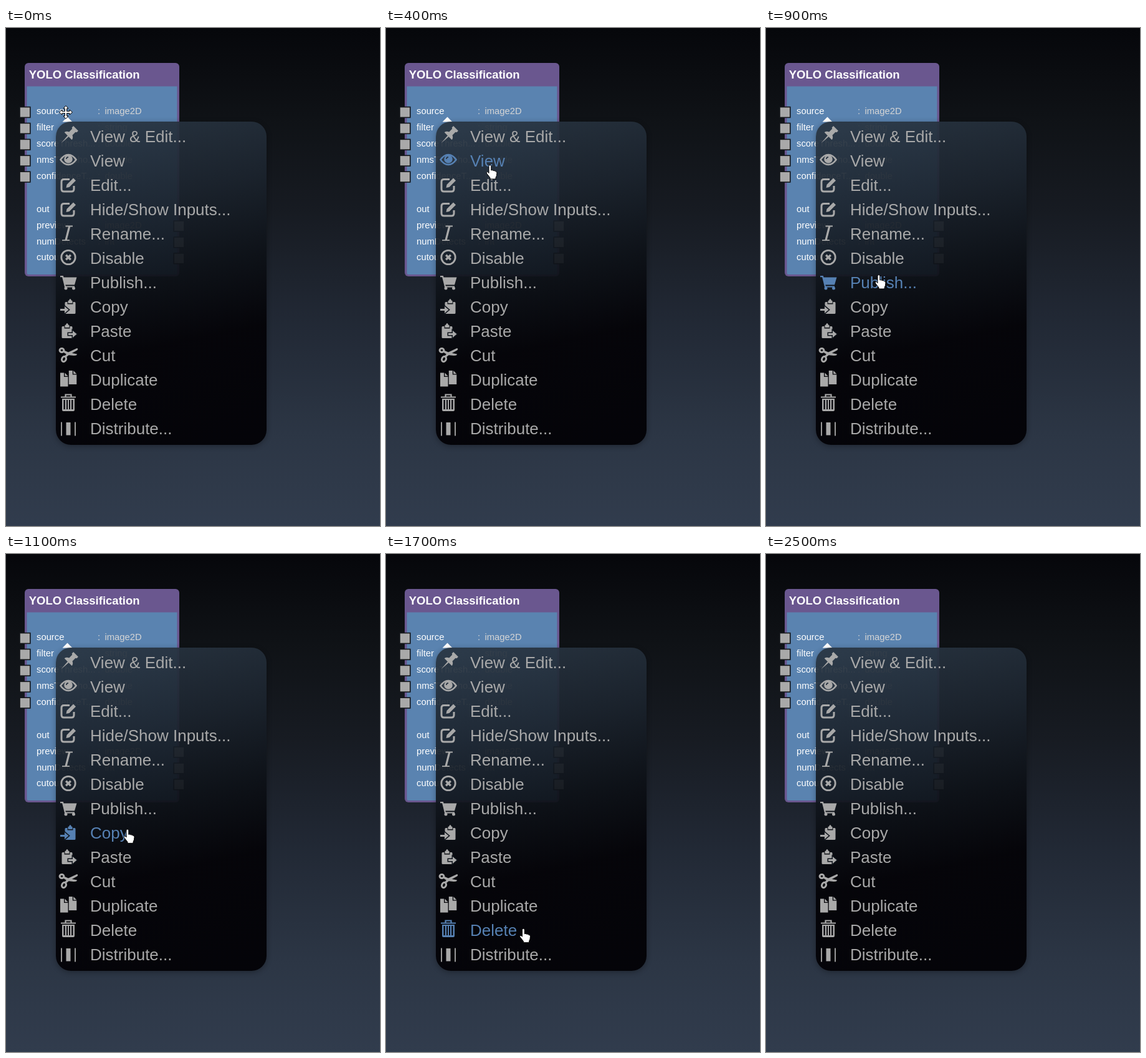
These frames come from a looping animation (600x798 px, 2600 ms). An HTML page:

```html
<!DOCTYPE html>
<html lang="en">
<head>
<meta charset="utf-8">
<title>Context menu</title>
<style>
  html, body { margin: 0; width: 100%; height: 100%; overflow: hidden; background: #14161a; }
  svg { display: block; width: 600px; height: 798px; }
  text { font-family: "Liberation Sans", Arial, sans-serif; white-space: pre; }
  .title { font-size: 18.5px; font-weight: bold; fill: #fff; }
  .label { font-size: 14.8px; fill: #fff; }
  .type { font-size: 14.8px; fill: #d5d5d5; }
  .port { fill: #a9a9a9; stroke: #15171b; stroke-width: 1.6; }
  .row { fill: #a9a9a9; stroke: #a9a9a9; }
  .row.hot { fill: #5681b3; stroke: #5681b3; }
  .row text { font-size: 26px; stroke: none; }
  .solid { stroke: none; }
  .line { fill: none; }
  .cut { stroke: #10151c; stroke-width: 3; paint-order: stroke; }
  .cursor { fill: #fff; stroke: #000; stroke-width: 1; stroke-linejoin: round; }
</style>
</head>
<body>
<svg viewBox="0 0 600 798">
  <defs>
    <linearGradient id="sky" x2="0" y2="1">
      <stop offset="0" stop-color="#06070b"/>
      <stop offset=".18" stop-color="#0f1216"/>
      <stop offset=".37" stop-color="#171b22"/>
      <stop offset=".58" stop-color="#212834"/>
      <stop offset=".82" stop-color="#2c3645"/>
      <stop offset="1" stop-color="#313c4d"/>
    </linearGradient>
    <linearGradient id="glass" gradientUnits="userSpaceOnUse" x1="190" y1="145" x2="300" y2="668">
      <stop offset="0" stop-color="#283441"/>
      <stop offset=".25" stop-color="#1b232d"/>
      <stop offset=".48" stop-color="#0d1117"/>
      <stop offset=".69" stop-color="#030206"/>
      <stop offset="1" stop-color="#010004"/>
    </linearGradient>
    <filter id="soft" x="-10%" y="-10%" width="120%" height="120%">
      <feGaussianBlur stdDeviation="5"/>
    </filter>
    <clipPath id="outside">
      <path clip-rule="evenodd" d="M0 0H600V798H0zM104 150H394a24 24 0 0 1 24 24V644a24 24 0 0 1-24 24H104a24 24 0 0 1-24-24V174a24 24 0 0 1 24-24z"/>
    </clipPath>
  </defs>

  <rect width="600" height="798" fill="url(#sky)"/>

  <rect x="30" y="56" width="248" height="342" rx="6" fill="#6a578f"/>
  <path d="M33.500 93.500h241v299q0 2.500-2.500 2.500h-236q-2.500 0-2.500-2.500z" fill="#5a83b0"/>
  <text class="title" x="36.700" y="81">YOLO Classification</text>
  <g id="node"></g>

  <path d="M98.500 142.500l8 8h-16z" fill="#fff"/>
  <g clip-path="url(#outside)">
    <rect x="80" y="152" width="338" height="518" rx="24" fill="#000" opacity=".3" filter="url(#soft)"/>
  </g>
  <rect x="80" y="150" width="338" height="518" rx="24" fill="url(#glass)" opacity=".93"/>
  <g id="menu"></g>

  <path id="move" class="cursor" transform="translate(96 135)"
    d="M0-10.500l4 4.500h-2.500v4.500h4.500v-2.500l4.500 4-4.500 4v-2.500h-4.500v4.500h2.500l-4 4.500-4-4.500h2.500v-4.500h-4.500v2.500l-4.500-4 4.500-4v2.500h4.500v-4.500h-2.500z"/>
  <path id="hand" class="cursor" visibility="hidden"
    d="M-2 12V1.500a1.900 1.900 0 0 1 3.800 0V8q2-1 3.400.6 2-.6 3.200 1 2.400-.2 2.600 2.400 0 5-2 8V22H0v-2L-5.500 13q-1-2 1-2.400 1.300-.2 2.500 2z"/>
</svg>

<script>
const $ = id => document.getElementById(id);

const inputs = [
  ["source", "image2D"], ["filter", "string"], ["scoreThresh...", "double"],
  ["nmsThresho...", "double"], ["confidenceT...", "double"]
];
const outputs = [["out", ""], ["preview", "image2D"], ["numDetects", "int"], ["cutouts", ""]];

const field = ([name, type], y) =>
  `<text class="label" x="49" y="${y}">${name}</text>` +
  (type && `<text class="type" x="147" y="${y}">:</text><text class="type" x="158.500" y="${y}">${type}</text>`);
const port = (x, y) => `<rect class="port" x="${x}" y="${y}" width="16.800" height="16.800"/>`;

$("node").innerHTML =
  inputs.map((f, i) => field(f, 138.3 + 25.8 * i) + port(22, 126.6 + 25.9 * i)).join("") +
  outputs.map((f, i) => field(f, 295 + 25.8 * i) + (i ? port(269.2, 283.2 + 25.9 * i) : "")).join("");

const solid = (d, more = "") => `<path class="solid" ${more} d="${d}"/>`;
const line = (d, w) => `<path class="line" stroke-width="${w}" d="${d}"/>`;

const edit = line("M2-9.500H-7q-4 0-4 4V6q0 4 4 4H5q4 0 4-4V1", 3) +
  solid("M-3.500 4l1-5L8-11.500l4 4L1.500 3z");
const board = x => `<g transform="translate(${x})">` +
  solid("M-7-8h2.500v3.500h9V-8H7q1.500 0 1.500 1.500V9.500q0 1.500-1.500 1.500H-7q-1.500 0-1.500-1.500V-6.500Q-8.500-8-7-8z") +
  solid("M-3.500-6v-4q2 0 2-1.500 1.500-3 3 0 0 1.500 2 1.500v4z") + "</g>";
const arrow = x => `<path class="cut" transform="translate(${x} 4.500)" d="M-7-1.500h7v-4l6.500 5.500-6.500 5.500v-4h-7z"/>`;
const sheet = (x, y) => `<g transform="translate(${x} ${y})">` + solid("M0 0h6v6.500h6.500V22H0z") + solid("M7.300 0l5.200 5.200H7.300z") + "</g>";

// Icons are drawn around the middle of their row.
const items = [
  ["View &amp; Edit...", solid("M-5.500-17h11v3.500l-1.800 1v7q4.300 2 4.800 6h-17q.5-4 4.800-6v-7l-1.800-1zM-1.200.5h2.400l-1.200 15.500z",
    'transform="translate(0 -1) rotate(45)"')],
  ["View", line("M-12.500-2Q-7-10 0-10T12.500-2Q7 6 0 6T-12.500-2z", 2.6) +
    solid("M-6.800-3a6.800 6.800 0 0 0 13.600 0 6.800 6.800 0 0 0-13.600 0zM-4-3q0-4 4-4v1.800q-2.200 0-2.200 2.200z", 'fill-rule="evenodd"')],
  ["Edit...", edit],
  ["Hide/Show Inputs...", edit],
  ["Rename...", line("M-4.500-12.500H7M-10 10.200H2", 1.8) + line("M1.800-12.500L-4 10.200", 3.2)],
  ["Disable", `<circle class="line" cy="-1.500" r="11.200" stroke-width="2.800"/>` + line("M-3.800-5.300L3.800 2.300M3.800-5.300L-3.800 2.300", 3.4)],
  ["Publish...", line("M-13-9.800h4L-5 6.500H10", 2.2) + solid("M-9-8.500H13.500L10 3.500H-6z") +
    `<circle class="solid" cx="-4" cy="9" r="2.500"/><circle class="solid" cx="8.500" cy="9" r="2.500"/>`],
  ["Copy", board(3) + arrow(-6)],
  ["Paste", board(-2) + arrow(7)],
  ["Cut", `<ellipse class="line" cx="-10.500" cy="-8.500" rx="3.400" ry="2.900" stroke-width="3"/>` +
    `<ellipse class="line" cx="-7" cy="5.500" rx="3.300" ry="4.300" stroke-width="3" transform="rotate(25 -7 5.500)"/>` +
    solid("M-8-9L1-5 14-2.500q0 2.500-5 2.500L-1-1-9-6zM-6.500 1L0-5.500 14-12q2.500 1.500 0 3.500L2-2-4 3z")],
  ["Duplicate", sheet(-13, -11.5) + sheet(0.8, -15)],
  ["Delete", line("M-12-11.500H12M-4.500-12v-3.500H4.500v3.500", 2.2) +
    solid("M-10-9H10V9q0 2-2 2H-8q-2 0-2-2zM-7.500-7V8h2.300V-7zM-2.900-7V8h1.900V-7zM1-7V8h1.900V-7zM5.200-7V8h2.300V-7z", 'fill-rule="evenodd"')],
  ["Distribute...", line("M-11-10.500V11.500M11-10.500V11.500", 1.8) + solid("M-3.500-10h7V10.500h-7z")]
];

const pitch = 39;
$("menu").innerHTML = items.map(([name, icon], i) =>
  `<g class="row" transform="translate(100 ${174 + pitch * i})">${icon}<text x="35" y="9">${name}</text></g>`
).join("");
const rows = [...document.querySelectorAll(".row")];

// Pointer stops: step, x, y
const path = [[0, 95, 128], [4, 167, 220], [6, 181, 313.5], [9, 181, 396], [14, 216, 509.5], [18, 222, 631]];
const loop = 2600, stepMs = 100, lastStep = 18;

function pointAt(step) {
  const i = Math.max(1, path.findIndex(p => p[0] >= step));
  const [s0, x0, y0] = path[i - 1], [s1, x1, y1] = path[i];
  const k = (step - s0) / (s1 - s0);
  return [x0 + (x1 - x0) * k, y0 + (y1 - y0) * k];
}

const show = (el, on) => el.setAttribute("visibility", on ? "visible" : "hidden");

function draw(ms) {
  const step = Math.floor(ms % loop / stepMs);
  const active = step > 0 && step <= lastStep;
  let hot = -1;
  if (active) {
    const [x, y] = pointAt(step);
    $("hand").setAttribute("transform", `translate(${x} ${y})`);
    hot = Math.floor((y - 158) / pitch);
  }
  show($("move"), step === 0);
  show($("hand"), active);
  rows.forEach((row, i) => row.classList.toggle("hot", i === hot));
}

const start = performance.now();
function tick() {
  draw(performance.now() - start);
  requestAnimationFrame(tick);
}
tick();
</script>
</body>
</html>
```
